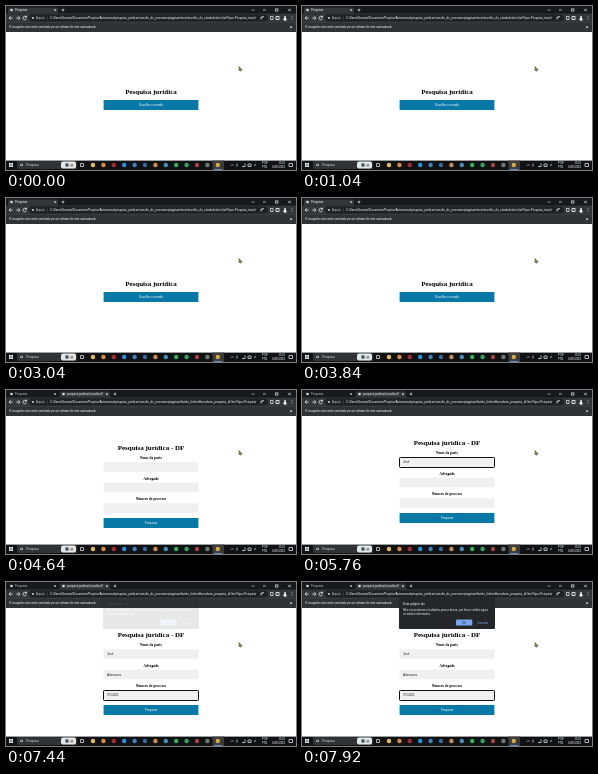
An HTML page that plays this animation: 290x164 px, repeating every 8000 ms.

```html
<!DOCTYPE html>
<html lang="pt-BR">
<head>
<meta charset="utf-8">
<title>Pesquisa jurídica</title>
<style>
html, body { margin: 0; width: 100%; height: 100%; overflow: hidden; background: #fff; }
svg { display: block; width: 290px; height: 164px; }
text { font-family: "Liberation Sans", Arial, sans-serif; white-space: pre; }
.serif { font-family: "Liberation Serif", "Times New Roman", serif; font-weight: bold; }
</style>
</head>
<body>
<svg id="stage" viewBox="0 0 290 164"></svg>
<script>
const NS = "http://www.w3.org/2000/svg";
const stage = document.getElementById("stage");
const LOOP = 8000, BLUE = "#0879a7", STRIP = "#18191c", BAR = "#35363a", LIGHT = "#f2f3f5";

function add(parent, tag, attrs) {
  const el = document.createElementNS(NS, tag);
  for (const k in attrs) el.setAttribute(k, attrs[k]);
  return parent.appendChild(el);
}
const group = (parent = stage) => add(parent, "g", {});
const rect = (p, x, y, width, height, fill, rx = 0) => add(p, "rect", { x, y, width, height, fill, rx });
const dot = (p, cx, cy, r, fill) => add(p, "circle", { cx, cy, r, fill });
const line = (p, d, stroke = LIGHT, w = 0.7) => add(p, "path", { d, stroke, "stroke-width": w, fill: "none" });
function text(p, str, x, y, size, fill, opts = {}) {
  const el = add(p, "text", { x, y, "font-size": size, fill, ...opts });
  el.textContent = str;
  return el;
}
const centered = (p, str, x, y, size, fill, cls = "") =>
  text(p, str, x, y, size, fill, { "text-anchor": "middle", class: cls });
const cross = (p, x, y, r = 1) =>
  line(p, `M${x - r} ${y - r}l${2 * r} ${2 * r}M${x + r} ${y - r}l${-2 * r} ${2 * r}`);
const plus = (p, x, y) => line(p, `M${x - 1.3} ${y}h2.6M${x} ${y - 1.3}v2.6`);
const show = (el, on) => el.setAttribute("visibility", on ? "visible" : "hidden");

function button(p, y, label, size) {
  rect(p, 97.6, y, 94.8, 10, BLUE);
  centered(p, label, 145, y + 6, size, "#fff");
}

function tab(p, x, label, active) {
  if (active) add(p, "path", { d: `M${x} 7.5q1 0 1-1.5v-3q0-1.5 1.5-1.5h47q1.5 0 1.5 1.5v3q0 1.5 1 1.5z`, fill: BAR });
  dot(p, x + 4.5, 4, 1.3, "#d8dade");
  text(p, label, x + 8, 4.9, 2.8, active ? "#fff" : "#c4c6ca");
  cross(p, x + 48, 4, 0.8);
}

// Browser window
rect(stage, 0, 0, 290, 164, "#fff");
rect(stage, 0, 0, 290, 8, STRIP);
const oneTab = group(), twoTabs = group();
tab(oneTab, 1, "Pesquisar", true);
plus(oneTab, 57, 4);
tab(twoTabs, 1, "Pesquisar", false);
tab(twoTabs, 53, "pesquisa-juridica/consulta-df", true);
rect(twoTabs, 98.5, 2, 5, 5, BAR);
cross(twoTabs, 101, 4, 0.8);
plus(twoTabs, 109, 4);
line(stage, "M246 3.5l1.2 1.2l1.2-1.2M257 4h2.6M269.5 2.8h2.4v2.4h-2.4z");
cross(stage, 283.5, 4, 1.2);

rect(stage, 0, 7.5, 290, 9, BAR);
line(stage, "M7 12h-4m1.8-1.8l-1.8 1.8l1.8 1.8M10 12h4m-1.8-1.8l1.8 1.8l-1.8 1.8");
line(stage, "M20.3 11a1.8 1.8 0 1 0 0 2M20.5 9.7v1.6h-1.6");
rect(stage, 23, 8.5, 239, 7, "#202124", 3.5);
dot(stage, 27, 12, 1.1, "#c4c6ca");
text(stage, "Arquivo", 30, 13, 2.7, "#c4c6ca");
line(stage, "M41.5 10.5v3", "#777", 0.4);
const view = add(stage, "svg", { x: 44, y: 8, width: 208, height: 8 });
const path = "C:/Users/Usuario/Documents/Projetos/Automacao/pesquisa_juridica/consulta_de_processos/paginas/";
const url = text(view, "", 0, 5, 2.9, "#fff");
line(stage, "M255 13.5v-2.5h2M256 12l2-2M264.5 10.5h2.5v3h-2.5z");
line(stage, "M270 10.5h3v3h-3z", LIGHT, 0.9);
dot(stage, 279, 11, 1, LIGHT);
dot(stage, 279, 13.3, 1.5, LIGHT);
for (const y of [10.4, 12, 13.6]) dot(stage, 286, y, 0.45, LIGHT);

rect(stage, 0, 16, 290, 10, "#303134");
rect(stage, 0, 16, 290, 0.4, "#4a4b4f");
text(stage, "O navegador está sendo controlado por um software de teste automatizado.", 3, 22.2, 2.6, "#fff");
cross(stage, 285, 21.2);

// Home page
const home = group();
centered(home, "Pesquisa jurídica", 145, 88, 7, "#000", "serif");
button(home, 94, "Escolha o estado", 3.1);

// Search form
const form = group();
centered(form, "Pesquisa jurídica - DF", 145, 54.5, 7, "#000", "serif");
const fields = [
  ["Nome da parte", "José", 67],
  ["Advogado", "Advocacia", 87.5],
  ["Número do processo", "0754321", 108]
].map(([label, value, y]) => {
  centered(form, label, 145, y - 2.8, 3.5, "#000", "serif");
  rect(form, 97.6, y + 0.3, 94.8, 9.5, "#f0f0f0");
  const ring = add(form, "rect", { x: 97.5, y: Math.floor(y) + 0.5, width: 95, height: 10, rx: 0.8, fill: "none", stroke: "#101010", "stroke-width": 1 });
  return { ring, value: text(form, value, 101, y + 6, 3, "#222") };
});
button(form, 123, "Pesquisar", 2.8);

// Alert
const alertBox = group();
rect(alertBox, 97, 15.5, 96, 31.5, "#25262a", 1);
text(alertBox, "Esta página diz", 101, 22.8, 3.2, "#fff");
text(alertBox, "Não encontramos resultados para a busca, por favor confira agora", 101, 28.9, 2.9, "#f2f3f5");
text(alertBox, "os dados informados.", 101, 32.8, 2.9, "#f2f3f5");
rect(alertBox, 154, 37.6, 16.3, 6, "#7ba4ee", 1);
centered(alertBox, "OK", 162.2, 41.5, 2.6, "#202124");
centered(alertBox, "Cancelar", 180.8, 41.5, 2.6, "#8ab4f8");

// Taskbar
rect(stage, 0, 154.6, 290, 9.4, "#111214");
for (const [x, y] of [[3, 157], [5.2, 157], [3, 159.2], [5.2, 159.2]]) rect(stage, x, y, 1.8, 1.8, "#e8f0f5");
rect(stage, 11, 155, 60, 8, "#303236", 0.8);
dot(stage, 15.5, 159, 1.3, LIGHT);
dot(stage, 15.5, 159, 0.8, "#303236");
text(stage, "Pesquisar", 20, 160, 2.9, "#dcdee2");
rect(stage, 55, 155.5, 15, 7, "#e2e7e8", 2);
dot(stage, 61, 159, 2, "#56676d");
dot(stage, 65.8, 159.3, 1.5, "#9d8f86");
line(stage, "M74.5 157.5h3v3h-3z");
rect(stage, 206.5, 154.6, 11.5, 9.4, "#3a3c40");
const apps = ["#e4c060", "#d98a4a", "#a12c34", "#2b91d9", "#3a7fc0", "#2f6da6",
  "#c98b5a", "#4c8fbf", "#2fb45a", "#35a75a", "#a5453f", "#6b7c70", "#d8a94a"];
apps.forEach((c, i) => dot(stage, 87 + i * 10.4, 159, 2.2, c));
rect(stage, 208, 163, 8, 0.7, "#77b7e6");
line(stage, "M225 159.5l1.2-1.2l1.2 1.2M231 157.5v3M236 160.5h3v-3M242 158h3v2.500h-3zM248 160l2-2");
text(stage, "POR", 256, 158.4, 2.6, "#fff");
text(stage, "PTB", 256, 161.9, 2.6, "#fff");
text(stage, "14:32", 279, 158.4, 2.6, "#fff", { "text-anchor": "end" });
text(stage, "10/05/2023", 279, 161.9, 2.6, "#fff", { "text-anchor": "end" });
line(stage, "M283 157.5h3.5v3h-3.5z");

// Pointer
add(stage, "path", { d: "M233 60.6v4l.9-.7l.7 1.3l.7-.4l-.6-1.300h1.200z", fill: "#d8bb5c", stroke: "#2a2a2a", "stroke-width": 0.6 });

// [start ms, form open, form offset, focused field, filled fields, alert opacity]
const steps = [
  [0, false, 0, -1, 0, 0],
  [4640, true, 5, -1, 0, 0],
  [4720, true, 0, -1, 0, 0],
  [5760, true, 0, 0, 1, 0],
  [6240, true, 0, 1, 2, 0],
  [6800, true, 0, 2, 3, 0],
  [7440, true, 0, 2, 3, 0.1],
  [7520, true, 0, 2, 3, 0.6],
  [7600, true, 0, 2, 3, 1]
];
let current = null;

function draw(now) {
  const t = now % LOOP;
  const step = steps.findLast(s => t >= s[0]);
  if (step !== current) {
    current = step;
    const [, open, offset, focus, filled, alpha] = step;
    show(home, !open);
    show(oneTab, !open);
    show(twoTabs, open);
    show(form, open);
    form.setAttribute("transform", `translate(0 ${offset})`);
    url.textContent = path + (open
      ? "distrito_federal/formulario_pesquisa_df.html?tipo=Pesquisa"
      : "inicio/escolha_do_estado/index.html?tipo=Pesquisa_inicial");
    fields.forEach((f, i) => {
      show(f.ring, open && i === focus);
      show(f.value, open && i < filled);
    });
    alertBox.setAttribute("opacity", alpha);
  }
  requestAnimationFrame(draw);
}
draw(performance.now());
</script>
</body>
</html>
```
